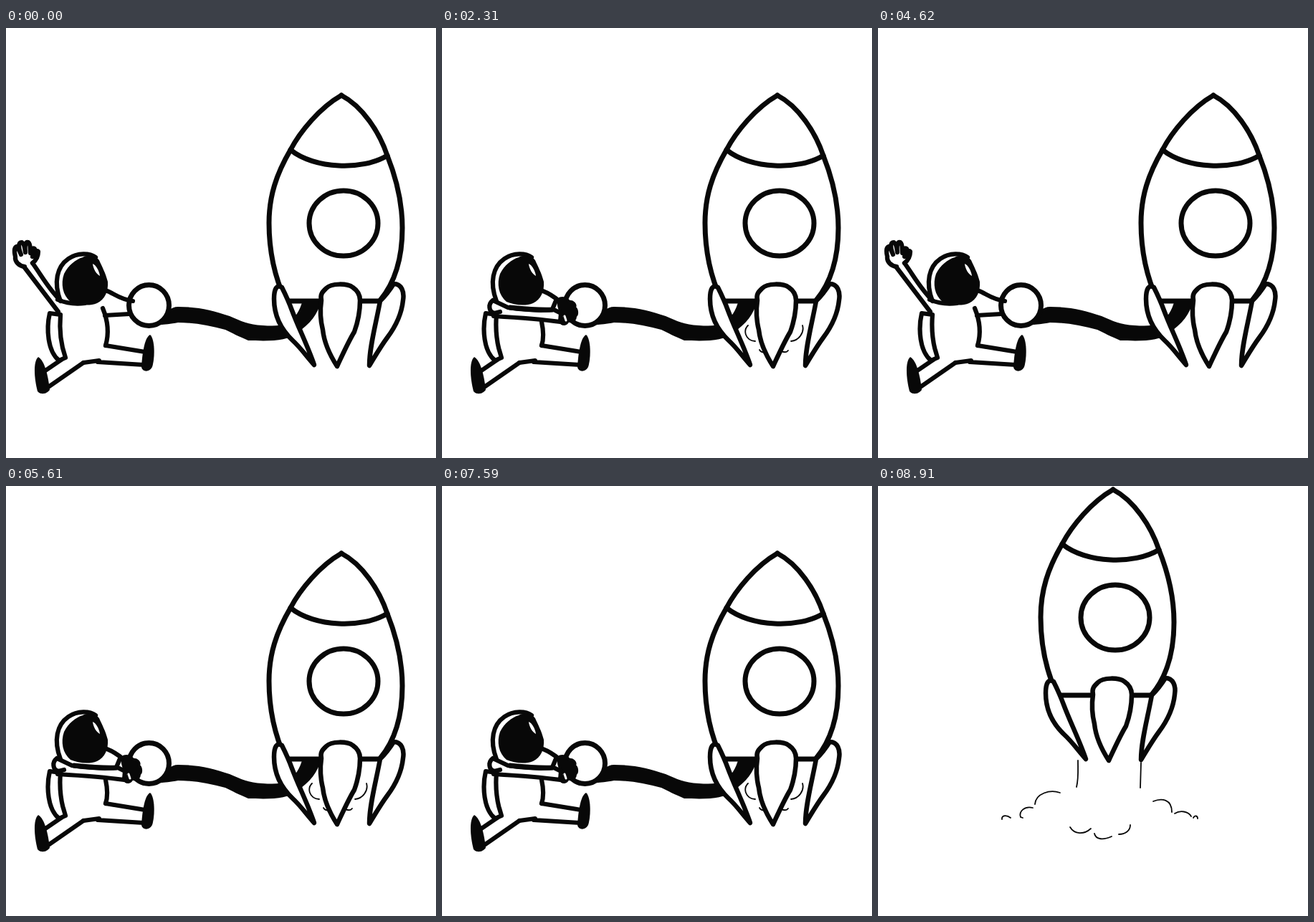
An HTML page for the animation above (9240 ms loop, 600 px wide and 600 px high).

```html
<!DOCTYPE html>
<html lang="en">
<head>
<meta charset="utf-8">
<title>Rocket launch</title>
<style>
html, body { margin: 0; width: 100%; height: 100%; overflow: hidden; background: #fff; }
svg { display: block; width: 100vw; height: 100vh; }
.line { fill: none; stroke: #080808; stroke-width: 6.2; stroke-linecap: round; stroke-linejoin: round; }
.bold { stroke-width: 7; }
.white { fill: #fff; }
.ink { fill: #080808; }
.thin { fill: none; stroke: #080808; stroke-width: 1.8; stroke-linecap: round; }
</style>
</head>
<body>
<svg viewBox="0 0 600 600">
  <!-- fuel hose -->
  <path id="hose" class="ink" d="M218 400 C226 396 230 389 240 389 C268 389 288 394 312 402 C328 409 338 414 358 415 C372 416 384 416 392 412 C404 405 410 394 414 380 L440 380 C436 398 424 414 406 425 C392 437 372 437 338 436 C324 430 316 426 306 421 C284 415 262 411 240 411 C230 413 220 414 216 414Z"/>

  <g id="rocket" class="line bold">
    <path d="M468 94 C438 111 410 145 397 170 C377 204 367 235 367 272 C367 312 376 350 390 380"/>
    <path d="M468 94 C497 109 521 145 532 178 C546 213 553 246 553 279 C553 322 542 356 522 380"/>
    <path d="M397 170 C430 197 498 199 532 178"/>
    <ellipse cx="471" cy="272.500" rx="48" ry="45.500"/>
    <path d="M394 381 H440 M494 381 H522"/>
    <g stroke-width="6.500">
      <path class="white" d="M385 362 C378 357 374 364 374 378 C374 400 382 419 400 436 C411 446 420 459 430 470 C422 446 408 418 399 394 C395 383 390 372 385 362Z"/>
      <path class="white" d="M440 380 C438 371 442 368 447 363 C454 356 476 356 484 362 C490 366 494 372 494 380 C494 398 490 413 486 424 C478 437 470 455 462 472 C451 455 444 440 442 421 C438 405 438 394 440 380Z"/>
      <path class="white" d="M522 381 C530 373 536 365 541 357 C552 357 556 368 554 380 C552 400 544 416 532 432 C523 444 515 458 507 471 C507 445 516 414 522 381Z"/>
    </g>
  </g>

  <g id="crew">
    <g class="line">
      <path d="M76 400 C74 424 77 443 83 460 L74 464 C58 451 56 420 61 398 L76 400"/>
      <path d="M139 443 L194 452 M108 467 L130 464 L128 466 L192 470"/>
      <path d="M77 463 L55 478 M108 467 L59 501"/>
    </g>
    <path class="ink" d="M201 428 C208 434 208 460 204 473 C200 481 190 480 189 473 C190 456 193 432 201 428Z"/>
    <path class="ink" d="M45 459 C54 464 59 486 61 505 C57 511 48 512 44 507 C40 492 37 466 45 459Z"/>
    <ellipse class="line bold white" cx="199.500" cy="387" rx="28" ry="28.500"/>

    <g id="wave" class="line">
      <path d="M135 391 C142 408 144 426 139 443"/>
      <path d="M138 366 C150 369 156 378 177 381 M138 401 L172 399"/>
      <path d="M25 333 L73 396 M37 328 C50 346 60 365 76 380"/>
      <path d="M26 333 C18 332 12 326 13 319 C11 311 12 306 15 305 C18 308 19 312 21 316 C17 306 17 299 22 299 C26 301 26 307 27 313 C26 304 27 298 31 299 C35 302 33 308 34 314 C35 309 37 306 40 308 L37 319 C40 314 43 309 45 312 C45 319 42 324 37 328"/>
      <path d="M72 379 C84 384 96 386 110 384"/>
    </g>

    <g id="pump" class="line">
      <path d="M139 410 C142 424 142 434 139 443"/>
      <path d="M138 366 C148 369 154 374 160 378 L155 390"/>
      <path d="M71 380 C64 385 65 396 73 398 L81 396 M71 380 L92 390 C112 393 134 395 156 393 L166 398 L165 410 C135 406 105 404 72 402"/>
      <path class="bold" d="M95 390 C115 392 134 394 154 393"/>
      <path class="ink" stroke-width="4" d="M162 379 C168 375 175 378 177 382 C183 381 187 386 185 390 C189 393 189 400 186 402 C186 408 180 411 176 408 C174 413 170 414 167 412 L171 402 L165 395 L163 387Z"/>
      <path d="M171 402 L173 408" stroke="#fff" stroke-width="3"/>
      <g class="thin">
        <path d="M427 415 C420 422 423 436 437 437"/>
        <path d="M503 415 C506 425 498 436 487 437"/>
        <path d="M443 449 C445 453 449 453 453 452 M473 450 C476 453 481 453 483 450"/>
      </g>
    </g>

    <path class="line" d="M76 381 C66 355 71 333 87 322 C100 313 117 314 125 320"/>
    <path class="ink" d="M107 320 C113 316 125 317 130 324 C134 333 139 342 142 354 C143 367 138 379 127 384 C115 389 100 386 90 382 C79 373 76 357 81 343 C87 331 97 323 107 320Z"/>
    <path d="M121 329 C126 331 130 339 131 346 C126 343 122 337 121 329Z" fill="#fff"/>
  </g>

  <g id="smoke" class="thin">
    <path d="M279 383 C279 397 280 408 277 420 M367 386 L366 421"/>
    <path d="M254 428 C240 423 220 429 219 444 M216 449 C205 446 196 454 199 462 L202 463 M185 463 C180 459 172 459 173 465"/>
    <path d="M384 440 C396 435 410 437 410 455 M414 457 C422 452 433 454 437 461 M440 463 C442 459 446 460 446 464"/>
    <path d="M268 476 C274 486 287 487 297 478 M302 485 C304 494 315 494 326 489 M336 486 C345 486 352 481 352 473"/>
  </g>
</svg>
<script>
const STEP = 330, COUNT = 28;
const el = id => document.getElementById(id);
const show = (id, on) => el(id).setAttribute('display', on ? 'inline' : 'none');

function draw(ms) {
  const step = Math.floor(ms / STEP) % COUNT;
  const launch = step === COUNT - 1;
  const pump = step % 2 === 1;
  show('hose', !launch);
  show('crew', !launch);
  show('wave', !pump);
  show('pump', pump);
  show('smoke', launch);
  el('rocket').setAttribute('transform', launch ? 'translate(-140 -89)' : 'translate(0 0)');
}

const start = performance.now();
function tick() {
  draw(performance.now() - start);
  requestAnimationFrame(tick);
}
tick();
</script>
</body>
</html>
```
